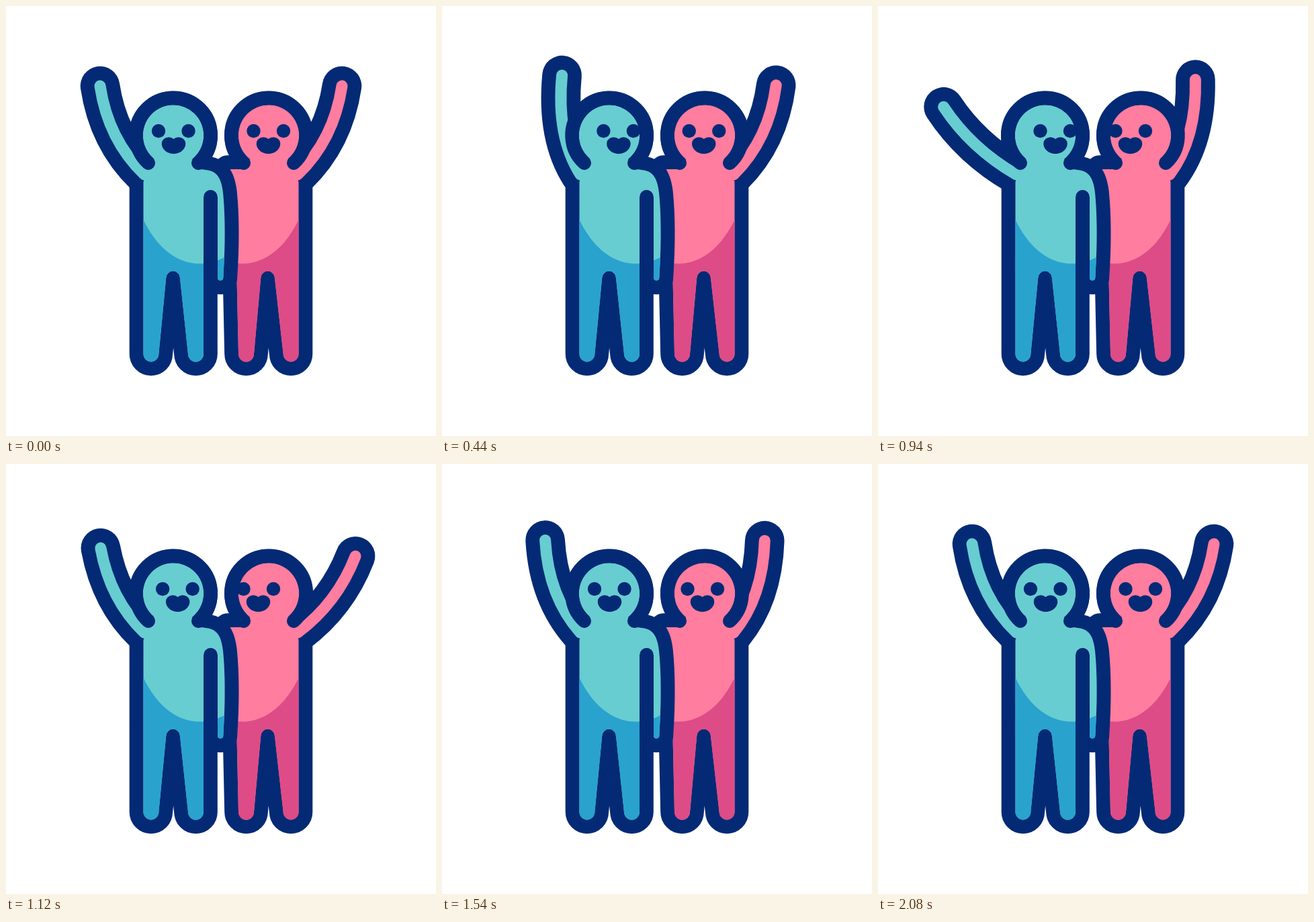
An HTML page with a canvas for the animation above (2.4 s loop, 640 by 640 pixels).

```html
<!DOCTYPE html>
<html lang="en">
<head>
<meta charset="utf-8">
<title>Waving friends</title>
<style>
html, body { margin: 0; width: 100%; height: 100%; overflow: hidden; background: #fff; }
canvas { display: block; width: 640px; height: 640px; }
</style>
</head>
<body>
<canvas id="stage" width="640" height="640"></canvas>
<script>
const ctx = document.getElementById('stage').getContext('2d');
const LOOP = 2400, LAG = 360;
const LINE = 20.5, EDGE = 20.8, ARM = 17;
const NAVY = '#042a75';
const BLUE = { light: '#67cdd1', dark: '#29a2ce' };
const PINK = { light: '#ff7d9f', dark: '#dd4c86' };
const HEAD = { x: 249, y: 192.5, r: 45.25 };
const SHOULDER = { x: 206, y: 251 };

// A raised arm is one curve: hand and bend, ending at the shoulder
const REST = { x: 140, y: 119, bx: 152, by: 199 };
const IN = { x: 179, y: 103, bx: 170, by: 194 };
const OUT = { x: 97, y: 150.5, bx: 138, by: 212 };

const mix = (a, b, k) => a + (b - a) * k;

// Eased progress from time a to time b
function ease(t, a, b) {
  const k = Math.min(1, Math.max(0, (t - a) / (b - a)));
  return 0.5 - 0.5 * Math.cos(Math.PI * k);
}

function blend(p, q, k) {
  return { x: mix(p.x, q.x, k), y: mix(p.y, q.y, k), bx: mix(p.bx, q.bx, k), by: mix(p.by, q.by, k) };
}

function armPose(t) {
  let p = blend(REST, IN, ease(t, 0, 472));
  p = blend(p, OUT, ease(t, 472, 920));
  p = blend(p, IN, ease(t, 920, 1305));
  return blend(p, REST, ease(t, 1305, 1700));
}

const faceShift = t => 15 * (ease(t, 0, 560) - ease(t, 895, 1300));

function armPath({ x, y, bx, by }) {
  const path = new Path2D();
  path.moveTo(x, y);
  path.quadraticCurveTo(bx, by, SHOULDER.x, SHOULDER.y);
  return path;
}

// Torso and legs; side is the part of the outline next to the friend
function bodyPath(crotch, side) {
  const path = new Path2D('M212 236 L204.5 262 V518');
  path.arc(215.9, 518, 11.4, Math.PI, 0, true);
  path.arc(crotch, 405, 10.4, Math.PI, 0);
  path.arc(282.5, 518, 11.5, Math.PI, 0, true);
  path.addPath(new Path2D());
  for (const [x, y] of side) path.lineTo(x, y);
  path.lineTo(276, 226);
  path.lineTo(221, 226);
  path.closePath();
  return path;
}

function circle(x, y, r, from = 0, to = Math.PI * 2) {
  const path = new Path2D();
  path.arc(x, y, r, from, to);
  return path;
}

function mouthPath(x, y) {
  const path = circle(x, y, 0);
  path.ellipse(x, y, 17.8, 15.5, 0, 0, Math.PI);
  for (const s of [-1, 1]) path.ellipse(x + s * 7.3, y, 10.5, 9.2, 0, 0, Math.PI * 2);
  return path;
}

// Shapes are those of the left figure; the right one is mirrored
const frontBody = bodyPath(248.6, [[294, 243.5], [286, 243.5]]);
const backBody = bodyPath(250.4, [[296.5, 405], [300, 300], [310, 243], [286, 243]]);
const nearArm = new Path2D('M282 243.5 H290 C312 243.5 320 252 323 278 C326 308 327 350 323.3 405 ' +
  'A4.2 4.2 0 0 1 315 405 V284 H288 Z');
const shade = new Path2D('M190 280 L204 317 C222 356 252 383.5 288 383.5 C302 383.5 316 380 330 371 V560 H190 Z');
const head = circle(HEAD.x, HEAD.y, HEAD.r);
const headLine = circle(HEAD.x, HEAD.y, HEAD.r + LINE / 2, Math.PI * 0.734, Math.PI * 2.266);
const armLine = new Path2D('M304.5 284 V420');
const mouth = mouthPath(249.5, 204.5);
const eyes = [circle(227, 186, 10.2), circle(271.5, 186, 10.2)];

function stroke(path, width, color) {
  ctx.lineWidth = width;
  ctx.strokeStyle = color;
  ctx.stroke(path);
}

function figure(t, { light, dark }, front) {
  const trunk = front ? [frontBody, nearArm] : [backBody];
  const parts = [...trunk, head];
  const arm = armPath(armPose(t));
  ctx.lineJoin = ctx.lineCap = 'round';

  parts.forEach(p => stroke(p, EDGE * 2, NAVY));
  stroke(arm, ARM + EDGE * 2, NAVY);
  ctx.fillStyle = light;
  parts.forEach(p => ctx.fill(p));
  stroke(arm, ARM, light);

  ctx.fillStyle = dark;
  for (const p of trunk) {
    ctx.save();
    ctx.clip(p);
    ctx.fill(shade);
    ctx.restore();
  }

  stroke(headLine, LINE, NAVY);
  if (front) stroke(armLine, LINE, NAVY);

  ctx.save();
  ctx.translate(faceShift(t), 0);
  ctx.fillStyle = NAVY;
  [...eyes, mouth].forEach(p => ctx.fill(p));
  ctx.restore();
}

function draw() {
  const t = performance.now() % LOOP;
  ctx.fillStyle = '#fff';
  ctx.fillRect(0, 0, 640, 640);
  ctx.save();
  ctx.translate(640, 0);
  ctx.scale(-1, 1);
  figure(t - LAG, PINK, false);
  ctx.restore();
  figure(t, BLUE, true);
  requestAnimationFrame(draw);
}
draw();
</script>
</body>
</html>
```
